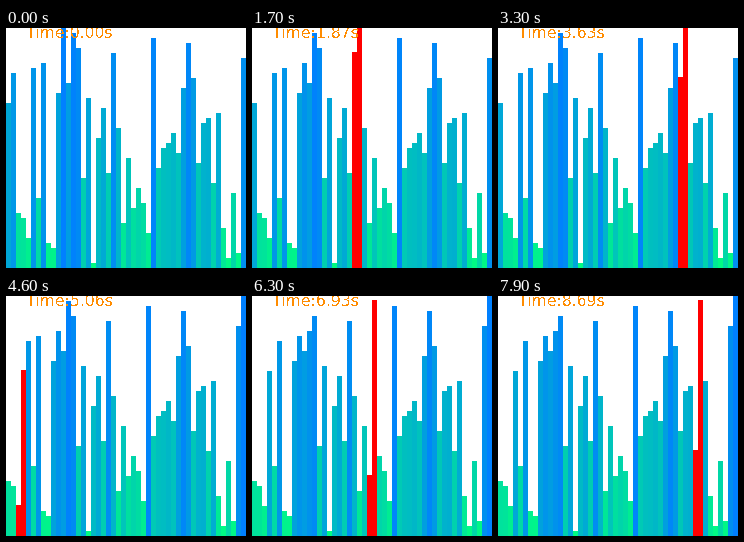
These frames come from a looping animation (240x240 px, 8 s). A matplotlib script:

```python
import matplotlib.pyplot as plt
import numpy as np
from matplotlib.animation import FuncAnimation

SIZE = 240
DPI = 100
FRAMES = 80
INTERVAL = 100
SECONDS_PER_SWAP = 0.11
RED = (1, 0, 0)

# The shuffled input, one value per bar.
START = [33, 39, 11, 10, 6, 40, 14, 41, 5, 4, 35, 48, 37, 47, 44, 18,
         34, 1, 26, 32, 19, 43, 28, 9, 22, 12, 16, 13, 7, 46, 20, 24,
         25, 27, 23, 36, 45, 38, 21, 29, 30, 17, 31, 8, 2, 15, 3, 42]
COUNT = len(START)
UNIT = SIZE / COUNT


def bubble_sort(values):
    """Yield the list and the swapped pair, once per swap."""
    values = list(values)
    yield values[:], ()
    for end in range(len(values) - 1, 0, -1):
        for j in range(end):
            if values[j] > values[j + 1]:
                values[j], values[j + 1] = values[j + 1], values[j]
                yield values[:], (j, j + 1)


def shade(value):
    t = value / COUNT
    return 0, 1 - t / 2, 0.5 + t / 2


steps = [step for step, _ in zip(bubble_sort(START), range(FRAMES))]

fig = plt.figure(figsize=(SIZE / DPI, SIZE / DPI), dpi=DPI, facecolor="white")
ax = fig.add_axes([0, 0, 1, 1])
ax.set_xlim(0, SIZE)
ax.set_ylim(0, SIZE)
ax.axis("off")

bars = ax.bar(np.arange(COUNT) * UNIT, np.zeros(COUNT), width=UNIT,
              align="edge", linewidth=0, antialiased=False)
label = ax.text(20, SIZE - 10, "", color="darkorange", family="DejaVu Sans",
                fontsize=15.6 * 72 / DPI, va="baseline", antialiased=False,
                zorder=3)


def draw(frame):
    values, pair = steps[frame]
    for i, (bar, value) in enumerate(zip(bars, values)):
        active = i in pair
        # Highlighted bars stand one pixel taller.
        bar.set_height(value * UNIT + active)
        bar.set_facecolor(RED if active else shade(value))
    label.set_text(f"Time:{frame * SECONDS_PER_SWAP:.2f}s")
    return [*bars, label]


anim = FuncAnimation(fig, draw, frames=FRAMES, interval=INTERVAL,
                     repeat=True, repeat_delay=0, blit=False)
plt.show()
```
